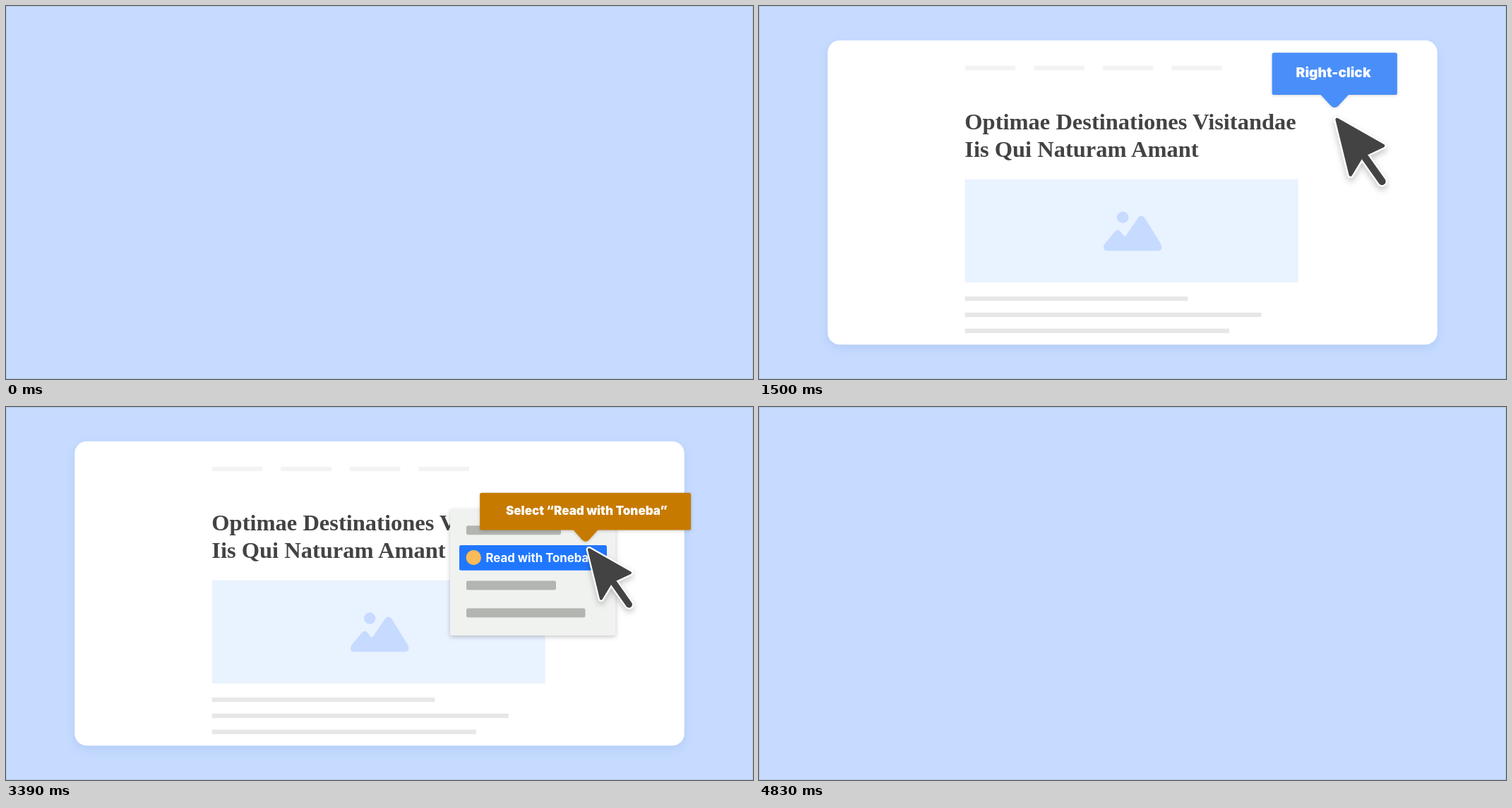
An HTML page that plays this animation: 1058x529 px, repeating every 4950 ms.

```html
<!DOCTYPE html>
<html lang="en">
<head>
<meta charset="utf-8">
<title>Right-click to read</title>
<style>
  html, body { margin: 0; width: 100%; height: 100%; overflow: hidden; background: #c6dbff; }
  svg { display: block; width: 1058px; height: 529px; }
  .heading { font: bold 32.5px "Liberation Serif", serif; fill: #434343; }
  .tip text { font: 900 17px Inter, sans-serif; fill: #fff; text-anchor: middle; }
  .item { font: 700 16.8px Inter, sans-serif; }
  .card { filter: drop-shadow(0 5px 7px rgba(80, 130, 200, .16)); }
  .panel { filter: drop-shadow(0 2px 3px rgba(0, 0, 0, .22)); }
  .tip { filter: drop-shadow(0 1px 2px rgba(0, 0, 0, .2)); }
  .arrow { filter: drop-shadow(0 4px 4px rgba(0, 0, 0, .22)); stroke-linejoin: round; stroke-linecap: round; }
</style>
</head>
<body>
<svg viewBox="0 0 1058 529">
  <defs>
    <path id="head" d="M2.5 3 L60.5 36 L34 48.5 L19.5 72.5Z"/>
    <path id="tail" d="M38 51 L59 80.8"/>
  </defs>
  <rect width="1058" height="529" fill="#c6dbff"/>
  <rect x=".5" y=".5" width="1057" height="528" fill="none" stroke="#b0c9ec"/>

  <g id="page">
    <rect class="card" x="97.3" y="48.7" width="863.4" height="431.6" rx="17" fill="#fff"/>
    <g id="nav" fill="#f3f3f3"></g>
    <g id="heading" class="heading">
      <text x="291.3" y="174.7">Optimae Destinationes Visitandae</text>
      <text x="291.3" y="213.8">Iis Qui Naturam Amant</text>
    </g>
    <g id="image">
      <rect x="291.7" y="245.7" width="472" height="146.3" fill="#e9f2ff"/>
      <g fill="#c6dbff">
        <circle cx="515.2" cy="299.8" r="8.2"/>
        <path d="M493 347.3 H565 Q573 346 569 337 L547 301.5 Q541.5 294 536.5 301 L520 325 Q518 327.5 516 325.3 L512 320 Q508 315.5 503.5 320.5 L489.5 337.5 Q485 346 493 347.3Z"/>
      </g>
    </g>
    <g id="lines" fill="#e7e7e7"></g>
    <g id="menu">
      <rect id="panel" class="panel" x="629" width="234.5" rx="2.5" fill="#f0f2f0"/>
      <g id="rows">
        <g fill="#b3b5b1">
          <rect x="652" y="168.3" width="134" height="13" rx="2.5"/>
          <rect x="652" y="246.5" width="127" height="13" rx="2.5"/>
          <rect x="652" y="285.4" width="168.5" height="13" rx="2.5"/>
        </g>
        <rect id="highlight" x="642" y="196" width="209" height="35.7" rx="2.5" fill="#2077ff"/>
        <circle cx="662.3" cy="213.6" r="10.6" fill="#f9bb57"/>
        <text id="item" class="item" x="679.5" y="219.6">Read with Toneba</text>
      </g>
    </g>
  </g>

  <g id="pointer">
    <g id="blueTip" class="tip" fill="#0061f7">
      <rect x="-79" y="-81" width="157" height="53" rx="2.5"/>
      <path d="M-19 -29 H18 L4 -14 Q-.5 -10 -5 -14Z"/>
      <text x="-2" y="-50">Right-click</text>
    </g>
    <g id="orangeTip" class="tip" fill="#c77a00">
      <rect x="-152.3" y="-77.4" width="299" height="52.6" rx="2.5"/>
      <path d="M-21 -26 H16 L2 -10.5 Q-2.5 -6.5 -7 -10.5Z"/>
      <text x="-1" y="-46.5">Select “Read with Toneba”</text>
    </g>
    <g id="arrow" class="arrow">
      <g fill="#fff" stroke="#fff">
        <use href="#head" stroke-width="8.6"/><use href="#tail" stroke-width="13.6"/>
      </g>
      <g fill="#434343" stroke="#434343">
        <use href="#head" stroke-width="4"/><use href="#tail" stroke-width="9.2"/>
      </g>
    </g>
  </g>
</svg>
<script>
const LOOP = 4950;
const $ = id => document.getElementById(id);
const ramp = (t, start, end) => Math.min(1, Math.max(0, (t - start) / (end - start)));
const sine = u => (1 - Math.cos(Math.PI * u)) / 2;
const easeOut = u => 1 - (1 - u) ** 2;
const fade = (node, value) => node.setAttribute('opacity', value);

function addBar(parent, x, y, width) {
  const bar = document.createElementNS('http://www.w3.org/2000/svg', 'rect');
  Object.entries({ x, y, width, height: 6.3 }).forEach(([k, v]) => bar.setAttribute(k, v));
  return parent.appendChild(bar);
}
const navBars = [0, 1, 2, 3].map(i => addBar($('nav'), 291.7 + 97.6 * i, 84.6, 71.5));
const textLines = [315.5, 420, 374.3].map((w, i) => addBar($('lines'), 291.7, 412 + 22.8 * i, w));

function draw(t) {
  fade($('page'), ramp(t, 40, 300) * (1 - ramp(t, 4410, 4815)));
  navBars.forEach((bar, i) => fade(bar, ramp(t, 400 + 70 * i, 690 + 70 * i)));
  fade($('heading'), ramp(t, 450, 810));
  fade($('image'), ramp(t, 460, 830));
  textLines.forEach((line, i) => fade(line, ramp(t, 1150 + 70 * i, 1280 + 70 * i)));

  // Context menu unrolls, then the chosen row lights up
  const open = easeOut(ramp(t, 2190, 2475));
  $('panel').setAttribute('y', 131 + 14 * open);
  $('panel').setAttribute('height', 179 * open);
  fade($('menu'), ramp(t, 2180, 2235));
  fade($('rows'), ramp(t, 2400, 2600));
  const lit = ramp(t, 3000, 3180);
  fade($('highlight'), lit);
  const shade = 67 + 188 * lit;
  $('item').setAttribute('fill', `rgb(${shade},${shade},${shade})`);

  // Pointer shrinks into place about its own centre, then slides to the row
  const scale = 1 + 0.47 * (1 - sine(ramp(t, 1170, 1680)));
  const slide = sine(ramp(t, 2630, 3730));
  const x = 848 - 28.5 * scale + 5 * slide;
  const y = 205 - 42 * scale + 46.3 * slide;
  $('pointer').setAttribute('transform', `translate(${x} ${y}) scale(${scale})`);
  fade($('arrow'), ramp(t, 1150, 1300) * (1 - ramp(t, 4245, 4440)));
  fade($('blueTip'), ramp(t, 1420, 1535) * (1 - ramp(t, 2380, 2560)));
  fade($('orangeTip'), ramp(t, 2960, 3140) * (1 - ramp(t, 4215, 4415)));
}

function tick() {
  draw(performance.now() % LOOP);
  requestAnimationFrame(tick);
}
tick();
</script>
</body>
</html>
```
